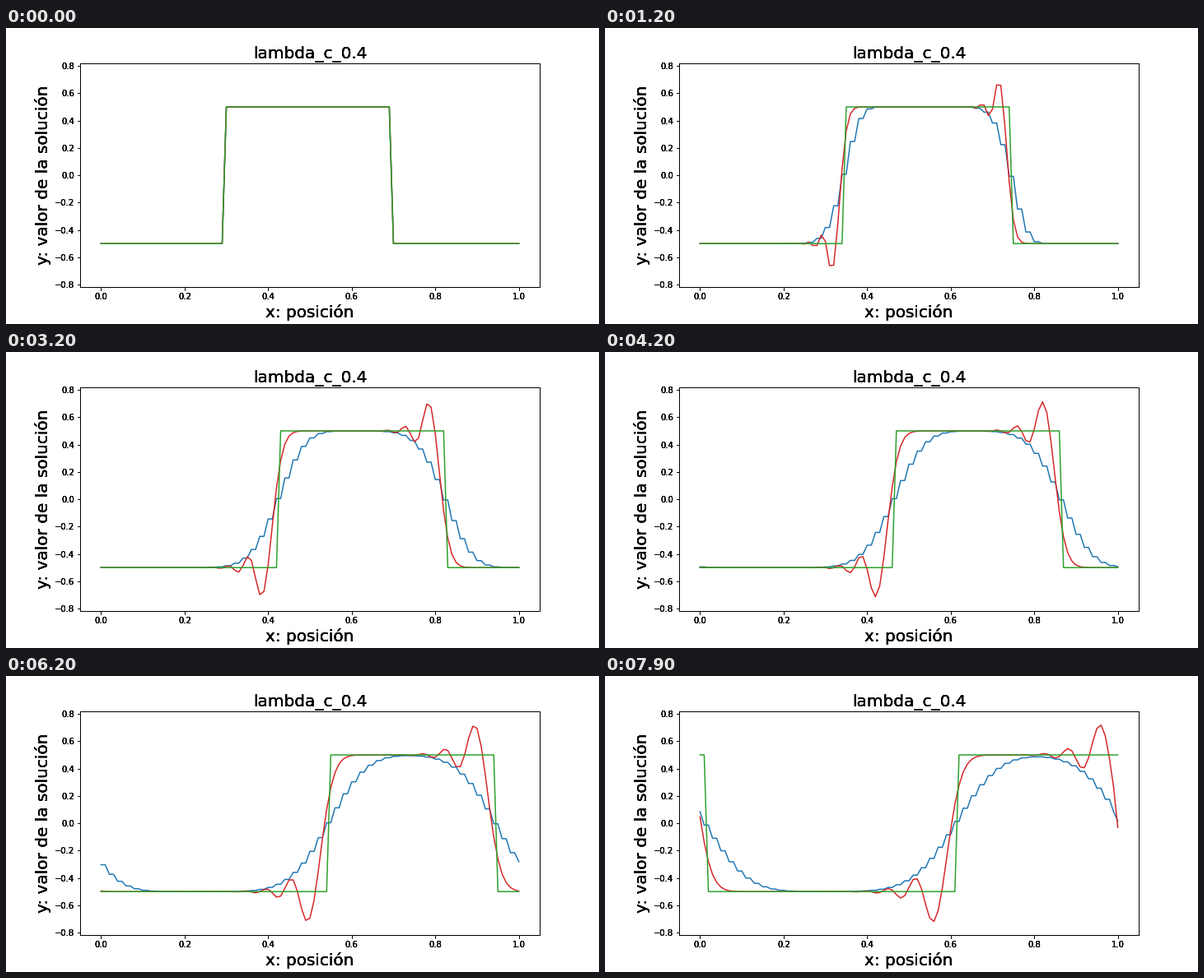
A matplotlib script that plays this animation: 720 by 360 pixels, repeating every 8 s.

```python
import matplotlib.pyplot as plt
import numpy as np
from matplotlib.animation import FuncAnimation

C = 0.4        # Courant number
CELLS = 100    # periodic cells, the plot repeats the first one at x = 1
FRAMES = 80

plt.rcParams.update({"font.family": "DejaVu Sans", "font.size": 10})


def lax_friedrichs(u):
    left, right = np.roll(u, 1), np.roll(u, -1)
    return (left + right) / 2 - C / 2 * (right - left)


def lax_wendroff(u):
    left, right = np.roll(u, 1), np.roll(u, -1)
    return u - C / 2 * (right - left) + C**2 / 2 * (right - 2 * u + left)


def exact(n):
    """Square pulse carried n steps; tenths of a cell keep it exact."""
    pos = (10 * np.arange(CELLS + 1) - round(10 * C) * n) % (10 * CELLS)
    return np.where((pos >= 300) & (pos < 700), 0.5, -0.5)


def solve(step):
    """All time levels; the end point lags its periodic twin by one step."""
    u = exact(0)[:-1]
    end = u[0]
    levels = []
    for _ in range(FRAMES):
        levels.append(np.append(u, end))
        end = u[0]
        u = step(u)
    return levels


def add_axes(fig):
    ax = fig.add_axes([0.125, 0.125, 0.775, 0.755])
    ax.patch.set_visible(False)
    ax.set_xlim(-0.05, 1.05)
    ax.set_ylim(-0.8175, 0.8175)
    ax.set_title("lambda_c_0.4", fontsize=20)
    ax.set_xlabel("x: posición", fontsize=20)
    ax.set_ylabel("y: valor de la solución", fontsize=20)
    return ax


fig = plt.figure(figsize=(10, 5), dpi=72, facecolor="white")
# Stacked copies give the text its hard, heavy edges.
ax = [add_axes(fig) for _ in range(4)][0]

x = np.linspace(0, 1, CELLS + 1)
curves = [solve(lax_friedrichs), solve(lax_wendroff),
          [exact(n) for n in range(FRAMES)]]
lines = [ax.plot(x, levels[0], color=color, lw=1.5)[0]
         for levels, color in zip(curves, ("tab:blue", "tab:red", "tab:green"))]


def update(n):
    for line, levels in zip(lines, curves):
        line.set_ydata(levels[n])
    return lines


anim = FuncAnimation(fig, update, frames=FRAMES, interval=100,
                     repeat=True, repeat_delay=0, blit=False)
plt.show()
```
